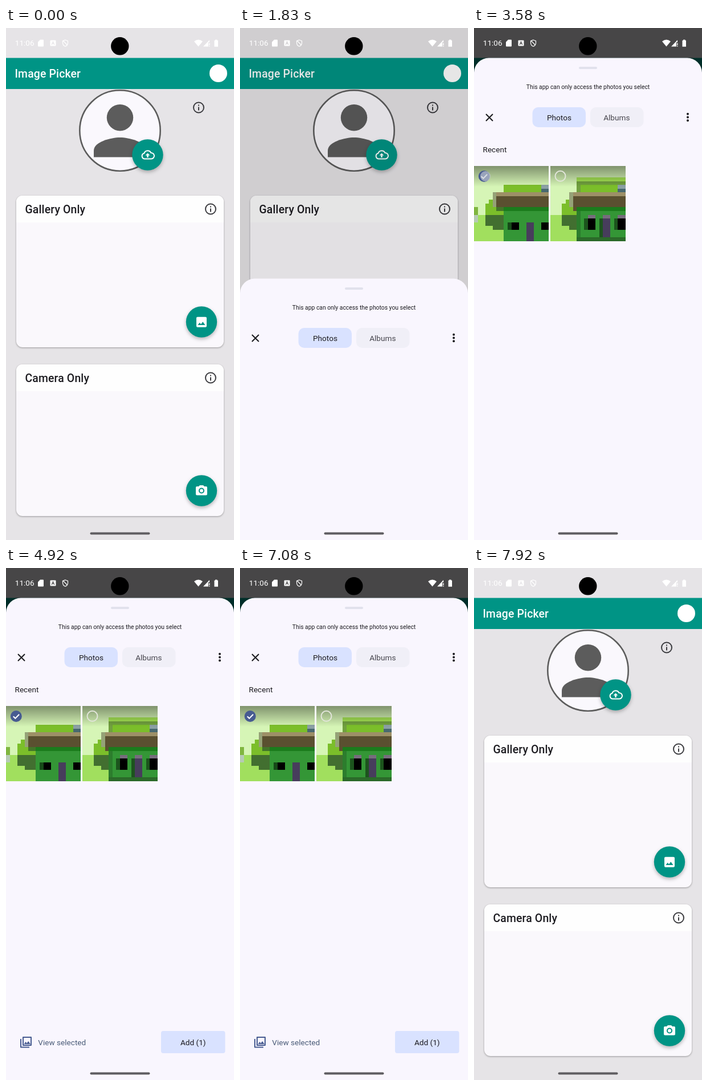
An HTML page that plays this animation: 400 px wide and 898 px high, repeating every 8000 ms.

```html
<!DOCTYPE html>
<html lang="en">
<head>
<meta charset="utf-8">
<title>Image picker</title>
<style>
html, body { margin: 0; width: 100%; height: 100%; overflow: hidden; background: #e6e4e7; }
svg { display: block; width: 100%; height: 100%; }
text { font: 13.6px Roboto, sans-serif; fill: #1c1b20; }
.title { font-size: 19.4px; font-weight: 500; letter-spacing: .15px; }
.mid { text-anchor: middle; }
.line { fill: none; stroke-width: 2; }
.fab { fill: #009485; filter: drop-shadow(0 3px 3px #0004); }
.card { filter: drop-shadow(0 1px 1.5px #0005); }

.scrim, .sheet, .loaded, .content, .progress, .bar, .tap1, .tap2, .check, .ring, .footer {
  animation: 8s linear infinite both;
}
.scrim { animation-name: scrim; }
.sheet { animation-name: sheet; }
.loaded { animation-name: loaded; }
.content { animation-name: content; }
.progress { animation-name: progress; }
.bar { animation-name: bar; }
.tap1 { animation-name: tap1; }
.tap2 { animation-name: tap2; }
.check { animation-name: check; }
.ring { animation-name: ring; }
.footer { animation-name: footer; }

@keyframes scrim {
  0%, 22.4% { opacity: 0; }
  25.8%, 95% { opacity: .69; }
  98.2%, 100% { opacity: 0; }
}
@keyframes sheet {
  0%, 22.4% { transform: translateY(850px); animation-timing-function: cubic-bezier(.1, .7, .2, 1); }
  26.6%, 95% { transform: none; animation-timing-function: cubic-bezier(.4, 0, .9, .6); }
  98.4%, 100% { transform: translateY(850px); }
}
@keyframes loaded {
  0%, 26.8% { opacity: 0; }
  27.6%, 100% { opacity: 1; }
}
@keyframes content {
  0%, 37.5% { transform: translateY(30px); animation-timing-function: ease-in-out; }
  39.5%, 100% { transform: none; }
}
@keyframes progress {
  0%, 37.49% { opacity: 1; }
  37.5%, 100% { opacity: 0; }
}
@keyframes bar {
  0%, 26.5% { transform: scaleX(0); }
  29.125% { transform: translateX(146px) scaleX(.595); }
  31.6% { transform: translateX(400px) scaleX(.4); }
  31.61% { transform: scaleX(0); }
  34.6% { transform: translateX(146px) scaleX(.595); }
  37.1%, 100% { transform: translateX(400px) scaleX(.4); }
}
@keyframes tap1 {
  0%, 15.5% { opacity: 0; }
  15.6%, 18.4% { opacity: 1; }
  19%, 100% { opacity: 0; }
}
@keyframes tap2 {
  0%, 43.4% { opacity: 0; }
  43.5%, 45.2% { opacity: 1; }
  46%, 100% { opacity: 0; }
}
@keyframes check {
  0%, 44.3% { opacity: 0; }
  44.7%, 100% { opacity: 1; }
}
@keyframes ring {
  0%, 44.3% { opacity: 1; }
  44.7%, 100% { opacity: 0; }
}
@keyframes footer {
  0%, 45.2% { opacity: 0; transform: translateY(86px); animation-timing-function: ease-out; }
  45.3% { opacity: 1; transform: translateY(86px); animation-timing-function: ease-out; }
  48.3%, 100% { opacity: 1; transform: none; }
}
</style>
</head>
<body>
<svg viewBox="0 0 400 898" preserveAspectRatio="none">
  <defs>
    <linearGradient id="shade" x2="0" y2="1">
      <stop stop-color="#000" stop-opacity=".4"/>
      <stop offset="1" stop-color="#000" stop-opacity="0"/>
    </linearGradient>
    <g id="info">
      <circle class="line" r="9" stroke="#3b3b3f"/>
      <path d="M-1-5h2v2h-2zM-1-1h2v6h-2z" fill="#3b3b3f"/>
    </g>
    <g id="card">
      <rect class="card" width="364" height="266" rx="11" fill="#faf8fc"/>
      <path d="M0 47V11A11 11 0 0 1 11 0H353A11 11 0 0 1 364 11V47z" fill="#fefefe"/>
      <use href="#info" x="341" y="23.5"/>
      <circle class="fab" cx="325" cy="221.5" r="27.2"/>
    </g>
    <!-- drawn on a 20 by 20 grid -->
    <g id="scene">
      <path d="M0 0h20v20H0z" fill="#d6f5b6"/>
      <path d="M0 13h20v7H0z" fill="#a1df5e"/>
      <path d="M8 5h12v8H3v-3h1V9h1V7h3z" fill="#7bbe2a"/>
      <path d="M3 13h5v4H5v-1H3z" fill="#426f30"/>
      <path d="M5 7h1v4H5z" fill="#95a277"/>
      <path d="M6 7h14v1H6z" fill="#9d9067"/>
      <path d="M6 8h14v4H6z" fill="#5a5030"/>
      <path d="M18 5h2v1h-2z" fill="#8ba0a4"/>
      <path d="M18 6h2v1h-2z" fill="#48696f"/>
    </g>
  </defs>

  <rect width="400" height="898" fill="#e6e4e7"/>
  <rect y="52.5" width="400" height="54.5" fill="#009485"/>
  <text class="title" x="15.5" y="87" style="fill:#fff">Image Picker</text>
  <circle cx="372.5" cy="79.5" r="15.5" fill="#fff"/>

  <circle cx="200" cy="180" r="70.7" fill="#faf8fd" stroke="#5c5c5c" stroke-width="2.6"/>
  <g fill="#5c5c5c">
    <circle cx="200" cy="157.2" r="23.2"/>
    <path d="M154 226.500v-11.500c0-15.500 30.700-23 46-23s46 7.500 46 23v11.500z"/>
  </g>
  <circle class="fab" cx="248.500" cy="222.500" r="27.2"/>
  <path class="line" d="M243 229.500a5 5 0 0 1-.6-9.800a6.500 6.500 0 0 1 12-.8a5.300 5.300 0 0 1 .6 10.600z" stroke="#fff"/>
  <path d="M248.500 219.500l4 4h-2.700v3.500h-2.600v-3.500h-2.700z" fill="#fff"/>
  <use href="#info" x="338" y="139.500"/>

  <use href="#card" x="18" y="294"/>
  <text class="title" x="33.500" y="325">Gallery Only</text>
  <path d="M336 506.700h14a2 2 0 0 1 2 2v14a2 2 0 0 1-2 2h-14a2 2 0 0 1-2-2v-14a2 2 0 0 1 2-2zM336.500 521h13l-4.200-5.700-3.300 4.300-2.300-2.900z" fill="#fff" fill-rule="evenodd"/>
  <use href="#card" x="18" y="590"/>
  <text class="title" x="33.500" y="620.500">Camera Only</text>
  <path d="M340 802h6l1.800 2h3.200a2 2 0 0 1 2 2v11.500a2 2 0 0 1-2 2h-16a2 2 0 0 1-2-2V806a2 2 0 0 1 2-2h3.200z" fill="#fff"/>
  <circle class="line" cx="343" cy="811.500" r="4" stroke="#009485"/>
  <circle class="tap1" cx="329.500" cy="518" r="9" fill="#c9d3d3" fill-opacity=".72"/>

  <rect class="scrim" width="400" height="898"/>

  <g class="sheet">
    <path d="M0 898V78A26 26 0 0 1 26 52.500H374A26 26 0 0 1 400 78V898z" fill="#f9f6fe"/>
    <rect x="184" y="68" width="32" height="4" rx="2" fill="#e1e1ec"/>
    <text class="mid" x="200" y="107" style="font-size:10.35px">This app can only access the photos you select</text>
    <path class="line" d="M21 151l12 12M33 151l-12 12" stroke="#1a1a1e"/>
    <rect x="102.500" y="139" width="93.500" height="35" rx="10" fill="#d9e2ff"/>
    <rect x="204" y="139" width="93.500" height="35" rx="10" fill="#f0eff7"/>
    <text class="mid" x="149.500" y="162">Photos</text>
    <text class="mid" x="250.300" y="162" style="fill:#47464e">Albums</text>
    <g fill="#1a1a1e">
      <circle cx="375" cy="150.700" r="2"/><circle cx="375" cy="156.500" r="2"/><circle cx="375" cy="162.300" r="2"/>
    </g>

    <g class="loaded">
      <g class="progress">
        <text class="mid" x="200.300" y="199.500" style="font-size:10.68px">Getting all your photos</text>
        <rect y="208.500" width="400" height="3" fill="#c9cbd4"/>
        <rect class="bar" y="208.500" width="400" height="3" fill="#525b86"/>
      </g>
      <g class="content">
        <text x="15.500" y="218">Recent</text>
        <g transform="translate(0 242.300) scale(6.56)" shape-rendering="crispEdges">
          <use href="#scene"/>
          <path d="M0 11h1v2H0z" fill="#80b640"/>
          <path d="M0 13h1v2H0z" fill="#b6cbb5"/>
          <path d="M8 12h12v8H8z" fill="#349636"/>
          <path d="M8 11h12v1H8z" fill="#1b7c1c"/>
          <path d="M6 11h2v1H6z" fill="#43752a"/>
          <path d="M9 15h1v2H9z" fill="#164a18"/>
          <path d="M10 15h2v2h-2zM18 15h2v2h-2z"/>
          <path d="M14 15h2v5h-2z" fill="#473d5c"/>
          <path d="M0 0h20v5.500H0z" fill="url(#shade)"/>
        </g>
        <g transform="translate(134.300 242.300) scale(6.56)" shape-rendering="crispEdges">
          <use href="#scene"/>
          <path d="M7 3h13v1H7z" fill="#a4e353"/>
          <path d="M7 4h13v1H7zM7 5h1v2H7z" fill="#71a03e"/>
          <path d="M7 12h13v8H7z" fill="#349636"/>
          <path d="M7 11h13v1H7z" fill="#1b7c1c"/>
          <path d="M7 12h1v7H7z" fill="#2c7d2d"/>
          <path d="M7 19h13v1H7z" fill="#2b6a29"/>
          <path d="M10 13h2v1h-2zM14 13h2v1h-2zM18 13h2v1h-2z" fill="#776d7d"/>
          <path d="M9 14h1v3H9zM13 14h1v5h-1zM17 14h1v3h-1z" fill="#1c541d"/>
          <path d="M10 14h2v3h-2zM18 14h2v3h-2z"/>
          <path d="M14 14h2v5h-2z" fill="#473d5c"/>
          <path d="M0 0h20v5.500H0z" fill="url(#shade)"/>
        </g>
        <circle class="line ring" cx="17.500" cy="259.800" r="9" stroke="#e2e5da"/>
        <circle class="line" cx="151.500" cy="259.800" r="9" stroke="#e2e5da"/>
        <g class="check">
          <circle cx="17.800" cy="260" r="10" fill="#475b91"/>
          <path class="line" d="M12.800 260.300l3.500 3.500 6.800-7" stroke="#fff"/>
        </g>
        <circle class="tap2" cx="20" cy="260" r="9" fill="#c5cbd2" fill-opacity=".65"/>
      </g>
    </g>

    <g class="footer">
      <path class="line" d="M26 826v14.500h15M30 823h14v14H30z" stroke="#475b91" stroke-linejoin="round"/>
      <path d="M31.500 835l3-4 2 2.500 2.700-3.500 3.800 5z" fill="#475b91"/>
      <text x="56.300" y="837" style="fill:#4b5c78">View selected</text>
      <rect x="272" y="812" width="112.500" height="39" rx="4" fill="#d9e2ff"/>
      <text class="mid" x="328.300" y="837">Add (1)</text>
    </g>
  </g>

  <text x="15.800" y="31" style="fill:#fff">11:06</text>
  <g fill="#fff">
    <path d="M60 20.500h5a1 1 0 0 1 1 1v10a1 1 0 0 1-1 1h-8a1 1 0 0 1-1-1V24.500z"/>
    <path d="M78.500 21.500h8a1 1 0 0 1 1 1v8a1 1 0 0 1-1 1h-8a1 1 0 0 1-1-1v-8a1 1 0 0 1 1-1zM79.600 29.500h1.200l.6-1.500h2.200l.6 1.500h1.200l-2.300-6h-1.200zM81.800 27l.7-2 .7 2z" fill-rule="evenodd"/>
    <path d="M330 23.500q7.500-6 15 0l-7.500 9z"/>
    <path d="M357 21v4h-2v7.500h-9zM356 26.500h1.500v3.500H356zM356 31h1.500v1.500H356z"/>
    <path d="M367 20.500h3.500v1.300h1.500v11h-6.500v-11h1.500z"/>
  </g>
  <path class="line" d="M104 21l4.500 1.700v3.300q0 4.500-4.500 6.300q-4.500-1.800-4.500-6.300v-3.300zM100.500 22.500l7 7.500" stroke="#fff" style="stroke-width:1.200"/>
  <circle cx="199.800" cy="31.800" r="15.700"/>
  <rect x="147.500" y="884.500" width="105" height="4" rx="2" fill="#605e62"/>
</svg>
</body>
</html>
```
